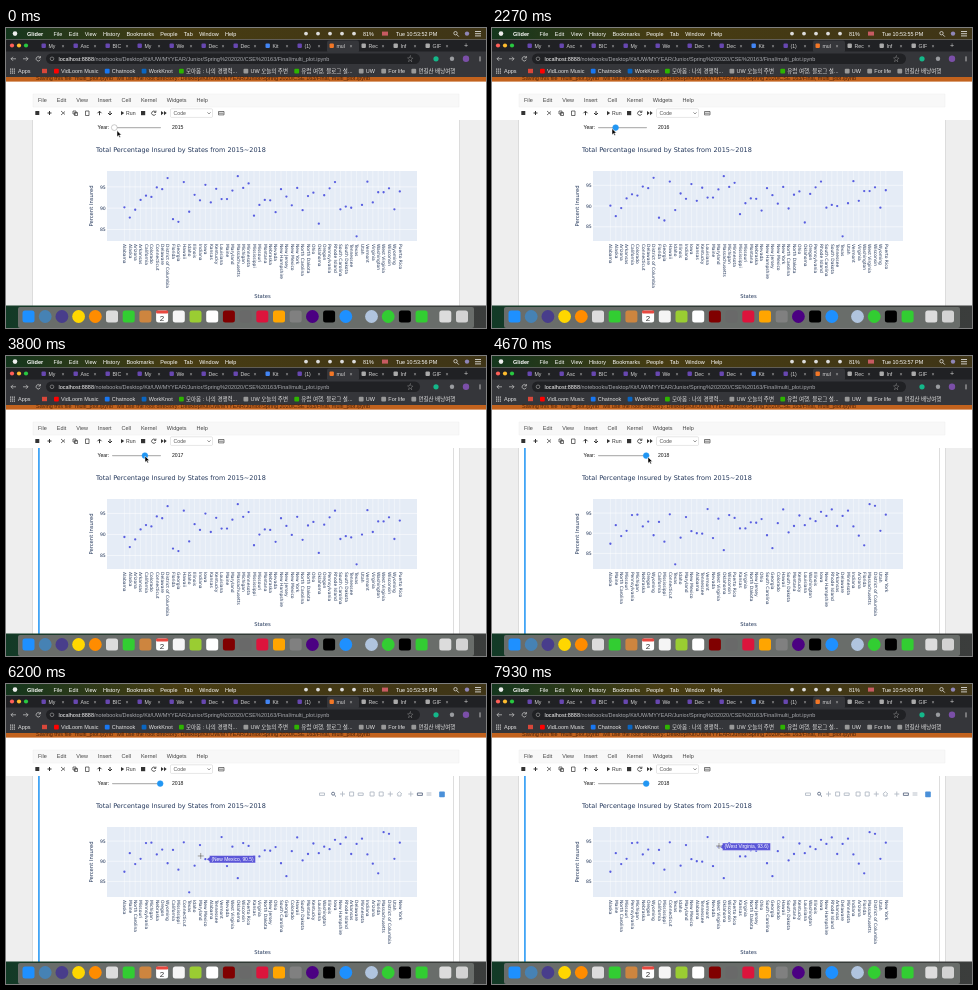
An HTML page for the animation above (8 s loop, 480 px wide and 300 px high).

```html
<!DOCTYPE html>
<html lang="en">
<head>
<meta charset="utf-8">
<title>Insured by state</title>
<style>
  html, body { margin: 0; width: 100%; height: 100%; overflow: hidden; background: #fff; }
  svg { display: block; width: 480px; height: 300px; }
  text { font-family: "Liberation Sans", "Noto Sans CJK KR", "Noto Sans CJK", sans-serif; white-space: pre; }
  .plot text { font-family: "DejaVu Sans", sans-serif; fill: #22365a; }
</style>
</head>
<body>
<svg id="stage" viewBox="0 0 480 300">
  <defs>
    <linearGradient id="sky">
      <stop offset="0" stop-color="#14361d"/><stop offset=".35" stop-color="#473c12"/><stop offset="1" stop-color="#3f3517"/>
    </linearGradient>
    <linearGradient id="ground">
      <stop offset="0" stop-color="#123a26"/><stop offset=".3" stop-color="#2d3a33"/><stop offset="1" stop-color="#3b3d3c"/>
    </linearGradient>
  </defs>
</svg>
<script>
const stage = document.getElementById('stage');
const LOOP = 8000;

function el(tag, attrs, parent = stage) {
  const node = document.createElementNS('http://www.w3.org/2000/svg', tag);
  for (const key in attrs) node.setAttribute(key, attrs[key]);
  return parent.appendChild(node);
}
const group = (cls = '') => el('g', { class: cls });
const rect = (x, y, width, height, fill, parent, rx = 0) => el('rect', { x, y, width, height, fill, rx }, parent);
const dot = (cx, cy, r, fill, parent) => el('circle', { cx, cy, r, fill }, parent);
const stroke = (d, color, width = 0.6, parent) => el('path', { d, stroke: color, 'stroke-width': width, fill: 'none' }, parent);
function text(x, y, str, size, fill, parent, extra = {}) {
  const node = el('text', { x, y, 'font-size': size, fill, ...extra }, parent);
  node.textContent = str;
  return node;
}
// Lays labels side by side with an even gap; each may get an icon colour.
function row(labels, x, y, gap, fill, icons = []) {
  labels.forEach((label, i) => {
    if (icons[i]) rect(x - 7, y - 4.3, 4.8, 4.8, icons[i], stage, 1);
    x += text(x, y, label, 5.5, fill).getComputedTextLength() + gap;
  });
}
const show = (node, on) => node.setAttribute('visibility', on ? 'visible' : 'hidden');

// ---- menu bar ----
rect(0, 0, 480, 11.5, 'url(#sky)');
dot(9, 5.6, 2.3, '#eee');
text(21, 7.6, 'Glider', 5.6, '#fff', stage, { 'font-weight': 700 });
row(['File', 'Edit', 'View', 'History', 'Bookmarks', 'People', 'Tab', 'Window', 'Help'], 47.5, 7.6, 6.4, '#fff');
for (let i = 0; i < 5; i++) dot(300 + i * 12, 5.6, 1.9, '#ddd');
text(357, 7.6, '81%', 5.4, '#fff');
rect(376, 3.6, 6, 4, '#c75b62');
const clock = text(390, 7.6, '', 5.4, '#fff');
el('circle', { cx: 449.5, cy: 5.2, r: 1.7, fill: 'none', stroke: '#eee', 'stroke-width': 0.7 });
stroke('M450.8 6.6l2 2M469 3.5h6M469 5.7h6M469 7.9h6', '#eee', 0.8);
dot(461, 5.6, 2.2, '#8f86b8');

// ---- browser tabs ----
rect(0, 11.5, 480, 12.5, '#202124');
['#ff5f57', '#febc2e', '#28c840'].forEach((color, i) => dot(6 + i * 7, 17.5, 2.1, color));
rect(321, 12.5, 32, 12, '#35363a', stage, 2);
['My', 'Asc', 'BIC', 'My', 'We', 'Dec', 'Dec', 'Kit', '(1)', 'mul', 'Rec', 'Inf', 'GIF'].forEach((label, i) => {
  const x = 35.5 + i * 32;
  rect(x, 15.5, 4.4, 4.4, i == 9 ? '#f37726' : i > 9 ? '#aaa' : i == 7 ? '#4285f4' : '#6747b0', stage, 1);
  text(x + 7, 19.5, label, 5.2, '#d5d5d5');
  text(x + 20, 19.5, '×', 5.2, '#bbb');
});
text(458, 20, '+', 7, '#ccc');

// ---- address and bookmarks ----
rect(0, 23.5, 480, 26, '#35363a');
stroke('M10 30.8h-5m2-2l-2 2l2 2M17 30.8h5m-2-2l2 2l-2 2M34 29.4a2.2 2.2 0 1 0 .3 2.3M34.4 28v2h-2', '#ccc', 0.7);
rect(40, 25.6, 374, 10.4, '#202124', stage, 5.2);
el('circle', { cx: 46, cy: 30.8, r: 1.8, fill: 'none', stroke: '#aaa', 'stroke-width': 0.6 });
const url = text(52.5, 32.7, 'localhost:8888', 5.5, '#fff');
el('tspan', { fill: '#a9abb0' }, url).textContent =
  '/notebooks/Desktop/Kit/UW/MYYEAR/Junior/Spring%202020/CSE%20163/Final/multi_plot.ipynb';
text(401, 33, '☆', 6.5, '#bbb');
dot(430, 30.8, 2.6, '#14b88a');
dot(446, 30.8, 2.2, '#9a9ca0');
dot(460, 30.8, 3.2, '#7b4fa8');
stroke('M474 28.4v5', '#ccc', 0.9);
stroke('M4 41.2h5M4 43.2h5M4 45.2h5', '#bbb', 1.2).setAttribute('stroke-dasharray', '1.2 .7');
text(12, 45, 'Apps', 5.5, '#e4e4e4');
rect(36, 40.8, 5, 4.4, '#d8473a');
row(['VidLoom Music', 'Chatnook', 'WorkKnot', '모아봄 : 나의 경쟁력...', 'UW 오늘의 주변', '유럽 여행, 블로그 설...', 'UW',
  'For life', '먼길산 배낭여행'], 55, 45, 13.3, '#e4e4e4',
  ['#f00', '#1877f2', '#0a66c2', '#2db400', '#999', '#2db400', '#999', '#999', '#999']);

// ---- notebook page ----
rect(0, 49, 480, 229, '#fff');
rect(0, 49, 480, 4.6, '#c2621d');
text(30, 52, 'Saving this file "multi_plot.ipynb" will use the root directory: Desktop/Kit/UW/MYYEAR/Junior/Spring 2020/CSE 163/Final, multi_plot.ipynb',
  5.5, '#4a2208');
rect(27, 66, 426, 13, '#f8f8f8');
stroke('M27 79V66H453V79Z', '#e7e7e7', 0.4);
row(['File', 'Edit', 'View', 'Insert', 'Cell', 'Kernel', 'Widgets', 'Help'], 32, 74, 9.9, '#444');
const ink = '#333';
rect(29.3, 83, 4, 4, ink, stage, 0.5);
stroke('M41.5 85h4M43.5 83v4M93.5 87.2v-4m-2 2l2-2l2 2M104 83v4m-2-2l2 2l2-2', ink, 1);
stroke('M55 83l4 3.5M55 87l4-3.5M67 83h3v3h-3zM68.5 84.5h3v3h-3zM79.5 83h3.5v4.5h-3.5z', ink, 0.7);
stroke('M149.5 84a2.1 2.1 0 1 0 .2 2M149.9 82.6v1.8h-1.8', ink, 0.8);
el('path', { d: 'M115 83l3.2 2.1l-3.2 2.1zM155 83l2.7 2.1l-2.7 2.1zM158 83l2.7 2.1l-2.7 2.1z', fill: ink });
text(120, 87, 'Run', 5.2, ink);
rect(135, 83, 4.2, 4.2, ink);
el('rect', { x: 164.5, y: 80.8, width: 42, height: 8.6, rx: 1, fill: '#fff', stroke: '#ccc', 'stroke-width': 0.5 });
text(167.5, 87, 'Code', 5.2, '#555');
stroke('M201.5 84.4l1.5 1.5l1.5-1.5', '#555', 0.7);
stroke('M212.5 83.5h5.5v3.4h-5.5zM213 85.2h4.5', '#444', 0.7);

rect(0, 92, 480, 186, '#eee');
rect(27, 92, 426, 186, '#fff');
stroke('M26.5 92V278M453.5 92V278', '#dcdcdc', 1);
const selection = group();
rect(32, 92, 1.8, 186, '#42a5f5', selection);
stroke('M447.5 92V278', '#bbb', 0.5, selection);

// ---- slider ----
text(91.5, 101.4, 'Year:', 5.1, '#111');
rect(106, 98.9, 49, 1.3, '#b5b5b5', stage, 0.6);
const knob = el('circle', { cy: 99.6, r: 2.9, 'stroke-width': 0.5 });
const yearText = text(166, 101.4, '', 5.1, '#111');

// ---- chart ----
// Share without insurance in the latest year; earlier years are bent from it.
const latest = ('Alaska 12.6,Maine 8,North Carolina 10.7,Missouri 9.4,Pennsylvania 5.5,Michigan 5.4,Nebraska 8.3,Oregon 7.1,' +
  'Wyoming 10.5,California 7.2,Mississippi 12.1,Connecticut 5.3,Texas 17.7,Idaho 11.1,Maryland 6,New Mexico 9.5,' +
  'Alabama 10,Tennessee 10.1,Vermont 4,Nevada 11.2,West Virginia 6.4,Oklahoma 14.2,Wisconsin 5.5,Puerto Rico 6.2,' +
  'Kansas 8.8,Virginia 8.8,North Dakota 7.3,New Jersey 7.4,Ohio 6.5,South Carolina 10.5,Georgia 13.7,Colorado 7.5,' +
  'Hawaii 4.1,South Dakota 9.8,Montana 8.2,Kentucky 5.6,Louisiana 8,Washington 6.4,Illinois 7,Iowa 4.7,' +
  'New Hampshire 5.7,Rhode Island 4.1,Arkansas 8.2,Delaware 5.7,Minnesota 4.4,Indiana 8.3,Arizona 10.6,Florida 13,' +
  'Massachusetts 2.8,District of Columbia 3.2,Utah 9.4,New York 5.4').split(',').map(entry => {
  const cut = entry.lastIndexOf(' ');
  return { name: entry.slice(0, cut), rank: (entry.slice(cut) - 2.8) / 14.9 };
});
const isLast = state => state.name == 'Puerto Rico';
const alphabetical = [...latest].sort((a, b) => isLast(a) - isLast(b) || a.name.localeCompare(b.name));
const PLOT = { left: 101, right: 411, top: 143, bottom: 213 };

function buildChart(states, best, worst, bend) {
  const g = group('plot');
  const yOf = rate => 148.2 + (rate - best) / (worst - best) * 60.1;
  const points = states.map(({ name, rank }, i) => {
    const rate = best + (worst - best) * (rank + bend * rank * (1 - rank));
    return { name, rate, x: 118.4 + i * 5.4, y: yOf(rate) };
  });
  rect(PLOT.left, PLOT.top, PLOT.right - PLOT.left, PLOT.bottom - PLOT.top, '#e5ecf6', g);
  for (const p of points) stroke(`M${p.x} ${PLOT.top}V${PLOT.bottom}`, '#fff', 0.4, g);
  for (const share of [95, 90, 85]) {
    const y = yOf(100 - share);
    stroke(`M${PLOT.left} ${y}H${PLOT.right}`, '#fff', 0.5, g);
    text(99.8, y + 1.7, share, 4.6, '', g, { 'text-anchor': 'end' });
  }
  for (const p of points) {
    dot(p.x, p.y, 1.15, '#575de0', g);
    text(0, 0, p.name, 4.45, '', g, { transform: `translate(${p.x - 1.2} 216) rotate(90)` });
  }
  return { g, points };
}
const charts = [buildChart(alphabetical, 2.5, 16.6, 0.14), buildChart(alphabetical, 2.8, 17.3, 0.03),
  buildChart(alphabetical, 2.8, 17.1, 0.25), buildChart(latest, 2.8, 17.7, 0)];
const titles = group('plot');
text(90, 124.4, 'Total Percentage Insured by States from 2015~2018', 6.47, '', titles);
text(256.5, 270, 'States', 5.28, '', titles, { 'text-anchor': 'middle' });
text(0, 0, 'Percent Insured', 5.28, '', titles, { 'text-anchor': 'middle', transform: 'translate(87 178) rotate(-90)' });

// ---- chart tools: one glyph per button, a space starts a new cluster ----
const tools = group();
const glyphs = { box: 'M-2 -2h4v4h-4z', plus: 'M-2.5 0h5M0 -2.5v5', zoom: 'M1 1l1.6 1.6M1.2 -.3a1.5 1.5 0 1 0 -3 0a1.5 1.5 0 1 0 3 0',
  wide: 'M-2.5 -1h5v2.4h-5z', home: 'M-2.6 0l2.6 -2.2l2.6 2.2M-1.6 0v2h3.2v-2', bars: 'M-2.4 -1h4.8M-2.4 1h4.8' };
let toolX = 316;
for (const cluster of ['wide', 'zoom plus box wide', 'box box plus home', 'plus wide bars']) {
  for (const name of cluster.split(' ')) {
    const dark = name == 'zoom' || (name == 'wide' && toolX > 400);
    stroke(glyphs[name], dark ? '#5f6d85' : '#b3bac6', 0.9, tools).setAttribute('transform', `translate(${toolX} 110)`);
    toolX += 9.1;
  }
  toolX += 2.3;
}
rect(433.2, 107.6, 5.6, 5.6, '#4a90d9', tools, 0.8);

const tip = group();
const tipBox = el('path', { fill: '#5a55d8', stroke: '#fff', 'stroke-width': 0.4 }, tip);
const tipText = text(6, 1.7, '', 4.9, '#fff', tip);

// ---- dock ----
rect(0, 277.5, 480, 22.5, 'url(#ground)');
rect(12, 279, 456, 21, '#696d6a', stage, 2);
('dodgerblue steelblue darkslateblue gold darkorange gainsboro limegreen peru white whitesmoke yellowgreen white maroon ' +
 'dimgray crimson orange gray indigo black dodgerblue lightsteelblue limegreen black limegreen gainsboro lightgray')
  .split(' ').forEach((color, i) => {
    const x = 22.5 + i * 16.7 + (i > 19) * 9 + (i > 23) * 7;
    const round = /gold|steelblue|darkorange|indigo|slate/.test(color) || i == 19 || i == 21;
    if (round) dot(x, 288.5, 6.4, color);
    else rect(x - 6, 282.5, 12, 12, color, stage, 2.5);
    if (i == 8) {
      rect(x - 6, 282.5, 12, 3, '#e8483f', stage, 1);
      text(x, 293, '2', 8, '#333', stage, { 'text-anchor': 'middle' });
    }
  });

// ---- pointer ----
const arrow = el('path', { d: 'M0 0V6.2L1.5 4.9L2.5 7.1L3.5 6.6L2.5 4.5H4.4Z', fill: '#000', stroke: '#fff', 'stroke-width': 0.5 });
const cross = group();
stroke('M-3 0H3M0-3V3', '#fff', 1.1, cross);
stroke('M-3 0H3M0-3V3', '#333', 0.5, cross);

// Each move: start, end, x, y reached at the end.
const moves = [[0, 0, 111, 102.5], [800, 1130, 120, 100.5], [2530, 3330, 139, 100], [4100, 4470, 156, 101],
  [4800, 5330, 166, 163.5], [5670, 6470, 205, 175], [6730, 7800, 227, 162]];

function pointerAt(t) {
  let x = 0, y = 0;
  for (const [from, to, toX, toY] of moves) {
    const u = to ? Math.max(0, Math.min(1, (t - from) / (to - from))) : 1;
    const k = u * u * (3 - 2 * u);
    x += (toX - x) * k;
    y += (toY - y) * k;
  }
  return { x, y };
}
const sliderStep = t => Math.max(0, Math.min(3, Math.round((pointerAt(t).x - 108) / 15.4)));

function drawTip(pointer, points) {
  const distance = p => Math.hypot(p.x - pointer.x, p.y - pointer.y);
  const near = points.reduce((a, b) => distance(b) < distance(a) ? b : a);
  const on = distance(near) < 7.5;
  show(tip, on);
  if (!on) return;
  tipText.textContent = `(${near.name}, ${+(100 - near.rate).toFixed(1)})`;
  const right = 8 + tipText.getComputedTextLength();
  tipBox.setAttribute('d', `M1 0L4 -2V-3.7H${right}V3.7H4V2Z`);
  tip.setAttribute('transform', `translate(${near.x} ${near.y})`);
}

function draw(t) {
  const pointer = pointerAt(t), step = sliderStep(t), shown = sliderStep(t - 150);
  const seconds = 52 + Math.floor((t + 730) / 1000);
  clock.textContent = `Tue 10:${53 + Math.floor(seconds / 60)}:${String(seconds % 60).padStart(2, '0')} PM`;

  knob.setAttribute('cx', 108.3 + step * 15.3);
  knob.setAttribute('fill', step ? '#2196f3' : '#fff');
  knob.setAttribute('stroke', step ? '#2196f3' : '#999');
  yearText.textContent = 2015 + step;
  show(selection, t >= 2870);
  charts.forEach((chart, i) => show(chart.g, i == shown));

  const inPlot = pointer.y > PLOT.top;
  show(tools, pointer.y > 106);
  show(arrow, !inPlot);
  show(cross, inPlot);
  (inPlot ? cross : arrow).setAttribute('transform', `translate(${pointer.x} ${pointer.y})`);
  if (inPlot) drawTip(pointer, charts[shown].points);
  else show(tip, false);
}

const start = performance.now();
function tick() {
  draw((performance.now() - start) % LOOP);
  requestAnimationFrame(tick);
}
tick();
</script>
</body>
</html>
```
